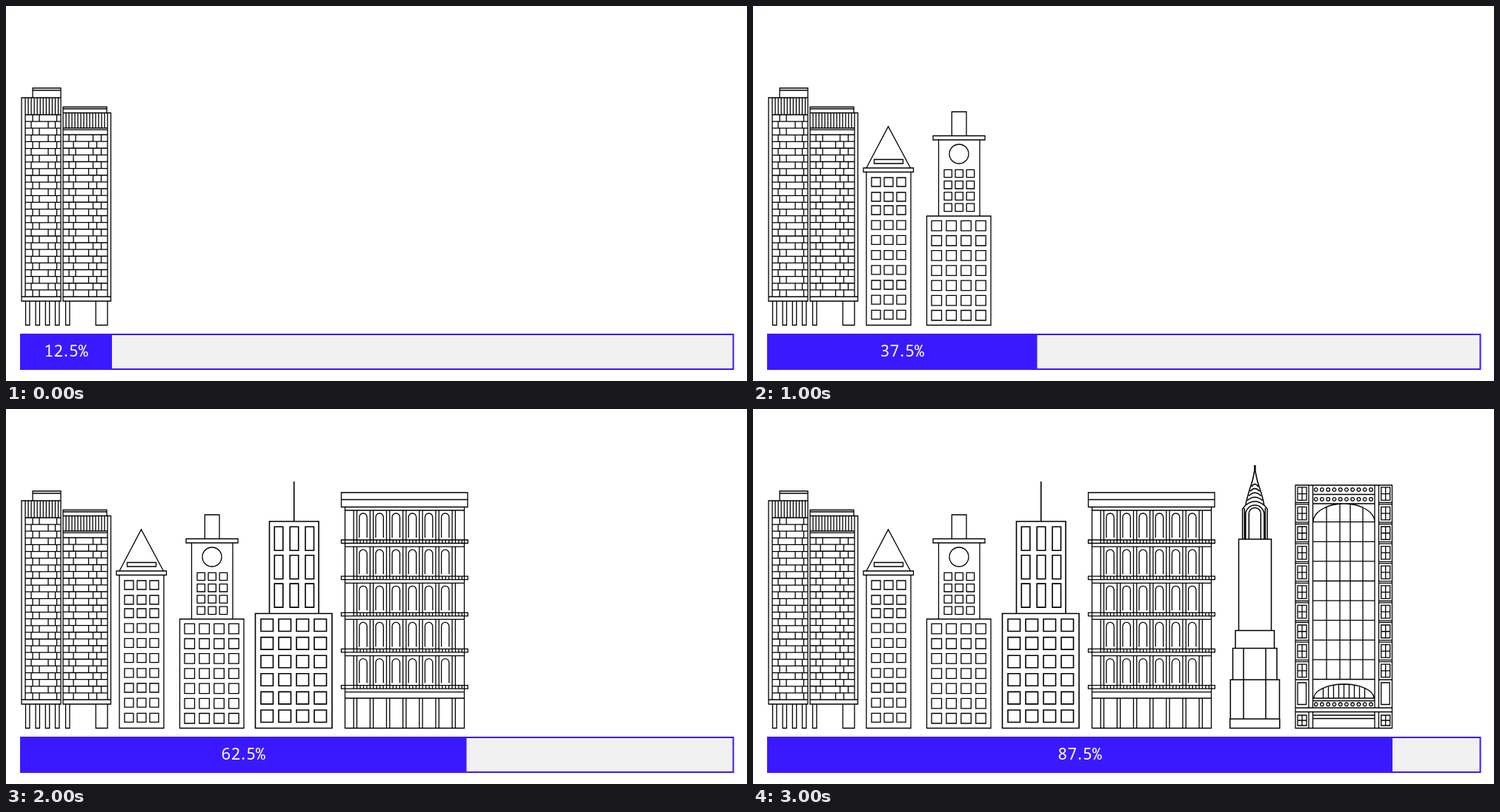
An HTML page for the animation above (3.5 s loop, 1000 px wide and 507 px high).

```html
<!DOCTYPE html>
<html lang="en">
<head>
<meta charset="utf-8">
<title>Skyline progress</title>
<style>
  html, body { margin: 0; width: 100%; height: 100%; overflow: hidden; background: #fff; }
  svg { display: block; width: 100%; height: 100%; }
  #city path { fill: none; stroke: #000; stroke-width: 1.3; }
  #label { font: 21.5px "Noto Sans Mono", monospace; fill: #fff; text-anchor: middle; }
</style>
</head>
<body>
<svg viewBox="0 0 1000 507">
  <g id="city"></g>
  <rect x="20" y="444" width="961.5" height="47" fill="#f1f1f1"/>
  <rect id="fill" x="20" y="444" height="47" fill="#3b19ff"/>
  <rect x="20" y="444" width="961.5" height="47" fill="none" stroke="#3b19ff" stroke-width="2"/>
  <text id="label" y="473.5"></text>
</svg>
<script>
const GROUND = 431.5;
const STEP = 500;
const ENDS = [143, 265, 383.5, 503.5, 621.5, 743, 863];

// Path helpers, all in absolute edges unless noted
const rect = (l, t, r, b) => `M${l} ${t}H${r}V${b}H${l}Z`;
const hor = (y, l, r) => `M${l} ${y}H${r}`;
const ver = (x, t, b) => `M${x} ${t}V${b}`;
const ring = (x, y, r) => `M${x - r} ${y}a${r} ${r} 0 1 1 ${2 * r} 0a${r} ${r} 0 1 1 ${-2 * r} 0Z`;
const arch = (l, r, t, b) => {
  const rad = (r - l) / 2;
  return `M${l} ${b}V${t + rad}A${rad} ${rad} 0 0 1 ${r} ${t + rad}V${b}`;
};
const times = (n, f) => Array.from({ length: n }, (_, i) => f(i)).join('');
const each = (list, f) => list.map(f).join('');
const series = (n, from, gap) => Array.from({ length: n }, (_, i) => from + i * gap);
const grid = (xs, ys, w, h) => each(xs, x => each(ys, y => rect(x, y, x + w, y + h)));

function bricks(l, r, top, rows, even, odd) {
  const h = (393 - top) / rows;
  return times(rows, i => {
    const y = top + i * h;
    return hor(y, l, r) + each(i % 2 ? odd : even, x => ver(x, y, y + h));
  });
}

function twinTowers() {
  const left = rect(36, 111, 74, 124) + hor(114, 36, 74) +
    rect(21, 124, 74, 399) + ver(26, 124, 393) + hor(393, 21, 74) +
    times(11, i => ver(30 + i * 4.05, 124, 147)) +
    bricks(26, 74, 147, 27, [36, 45, 68.5], [34, 57, 66.5]);
  const right = rect(77, 136.5, 136, 144.5) + hor(139, 77, 136) +
    rect(77, 144.5, 141.5, 399) + ver(137, 144.5, 393) + hor(393, 77, 141.5) +
    times(14, i => ver(81 + i * 4, 144.5, 165)) +
    hor(165, 77, 137) + hor(167.3, 77, 137) +
    bricks(77, 137, 174, 24, [85, 94, 117.5, 128.5], [91, 111.5, 122.5]);
  const legs = each([26.5, 40, 53.3, 66.5, 80.5], x => rect(x, 399, x + 5.4, GROUND));
  return left + right + legs + rect(121.2, 399, 137, GROUND);
}

function pointedTower() {
  return 'M153 219L182.5 163L212.5 219' + rect(163.5, 207.5, 202.5, 213) +
    rect(149, 219, 216.5, 224.5) + rect(153, 224.5, 213, GROUND) +
    grid([160, 177, 194], [232, 252, ...series(8, 270, 20.2)], 12, 12);
}

function clockTower() {
  return rect(268.3, 143, 288, 175.5) + rect(243, 175.5, 313, 181) +
    rect(250.5, 181, 306, 284) + ring(278, 200, 13) +
    grid([258, 273, 288.2], series(4, 221.3, 15.3), 10.4, 10.4) +
    rect(234.5, 284, 321, GROUND) +
    grid(series(4, 241, 19.9), series(7, 290.3, 20.2), 13.5, 13.5);
}

function antennaTower() {
  return ver(388.7, 98, 152) + rect(355.5, 152, 422, 276.5) +
    grid([362.3, 383.2, 404], series(3, 159.3, 38.4), 11.5, 32) +
    rect(336.5, 276.5, 440, GROUND) +
    grid(series(4, 344, 24), series(6, 284, 24.6), 16.5, 16.5);
}

function arcade() {
  const gap = 22.15;
  const pillars = (t, b) => times(7, i => ver(469.2 + i * gap, t, b) + ver(473.5 + i * gap, t, b));
  const floor = i => {
    const y = 137 + i * 49.15;
    return hor(y, 457.5, 618.5) + pillars(y, y + 40) +
      times(6, k => arch(476.8 + k * gap, 487.2 + k * gap, y + 4, y + 37)) +
      rect(452.5, y + 40, 623.3, y + 44.5) +
      times(34, k => ver(469.2 + k * 4.43, y + 40, y + 44.5));
  };
  return rect(452.5, 113, 623, 132.5) + hor(122.5, 452.5, 623) +
    rect(457.5, 132.5, 618.5, GROUND) + times(5, floor) +
    hor(382.7, 457.5, 618.5) + hor(391, 457.5, 618.5) + pillars(391, GROUND);
}

function spireTower() {
  const c = 677.3;
  const side = s => `M${c + s * .6} 76V84Q${c + s * 3} 98 ${c + s * 6.5} 107` +
    `Q${c + s * 11} 121 ${c + s * 12.5} 130L${c + s * 16.7} 135V176`;
  const scallops = times(5, i => {
    const w = 4.4 + i * 1.9, y = 105 + i * 6.2;
    return `M${c - w} ${y}Q${c} ${y - 7 - i * .6} ${c + w} ${y}`;
  });
  return side(-1) + side(1) + scallops +
    arch(c - 12.5, c + 12.5, 130, 176) + arch(c - 8, c + 8, 133.5, 176) +
    ver(c - 14, 134, 176) + ver(c + 14, 134, 176) +
    rect(655.5, 176, 699.5, 299.5) + rect(651, 299.5, 703.5, 323.5) +
    rect(647.5, 323.5, 707, 366) + rect(644.3, 366, 710.5, 419) +
    ver(662, 323.5, 419) + ver(692, 323.5, 419) + rect(643.7, 419, 710.8, GROUND);
}

function archTower() {
  const gap = 26.6;
  const pane = (x, y, h) => rect(x, y, x + 12, y + h) + ver(x + 6, y, y + h) + hor(y + h / 2, x, x + 12);
  const wing = (l, r, x) => times(10, i => {
    const y = 126.5 + i * gap;
    return pane(x, y - 20.7, 17.5) + hor(y, l, r) + (i < 9 ? hor(y + 2.4, l, r) : '');
  }) + hor(366, l, r) + rect(x, 370, x + 11.5, 399.5) + pane(x, 414, 14);
  const dots = y => times(10, i => ring(759.7 + i * 8.25, y, 2.3));
  const middle = each([109, 122, 399.3], dots) +
    each([115.5, 128], y => hor(y, 755.5, 839)) +
    times(9, i => hor(152.7 + i * gap, 755.5, 839)) +
    each([774, 792, 806, 823], x => ver(x, Math.abs(x - 798) > 15 ? 132 : 128.5, 366)) +
    'M756 152.7A41.5 24.7 0 0 1 839 152.7';
  const base = 'M757 391A40.5 19 0 0 1 838 391' + hor(391, 755.5, 839) + hor(394.5, 755.5, 839) +
    times(9, i => {
      const x = 769.5 + i * 7;
      return ver(x, 391 - 19 * Math.sqrt(1 - ((x - 797.5) / 40.5) ** 2), 391);
    }) +
    hor(404, 732, 862.5) + hor(409.5, 732, 862.5) +
    hor(414, 755.5, 839) + hor(418.5, 755.5, 839);
  return rect(732, 103, 862.5, GROUND) +
    each([750, 755.5, 839, 844.5], x => ver(x, 103, 404) + ver(x, 409.5, GROUND)) +
    wing(732, 750, 735) + wing(844.5, 862.5, 847.7) + middle + base;
}

const city = document.getElementById('city');
const bar = document.getElementById('fill');
const label = document.getElementById('label');

const parts = [twinTowers, pointedTower, clockTower, antennaTower, arcade, spireTower, archTower].map(draw => {
  const path = document.createElementNS('http://www.w3.org/2000/svg', 'path');
  path.setAttribute('d', draw());
  city.append(path);
  return path;
});
parts[3].style.strokeWidth = 1.6;
parts[5].style.strokeWidth = 1.5;

let shown = -1;
function show(step) {
  if (step === shown) return;
  shown = step;
  parts.forEach((p, i) => { p.style.display = i <= step ? '' : 'none'; });
  const end = ENDS[step];
  bar.setAttribute('width', end - 20);
  label.setAttribute('x', (19 + end) / 2);
  // The decimal point sits tighter than its monospaced cell
  label.innerHTML = `${(step + 1) * 12.5}%`.replace('.', '<tspan dx="-2.5">.</tspan><tspan dx="-2.5">') +
    (step % 2 ? '' : '</tspan>');
}

const start = performance.now();
function tick() {
  show(Math.floor((performance.now() - start) / STEP) % ENDS.length);
  requestAnimationFrame(tick);
}
show(0);
requestAnimationFrame(tick);
</script>
</body>
</html>
```
